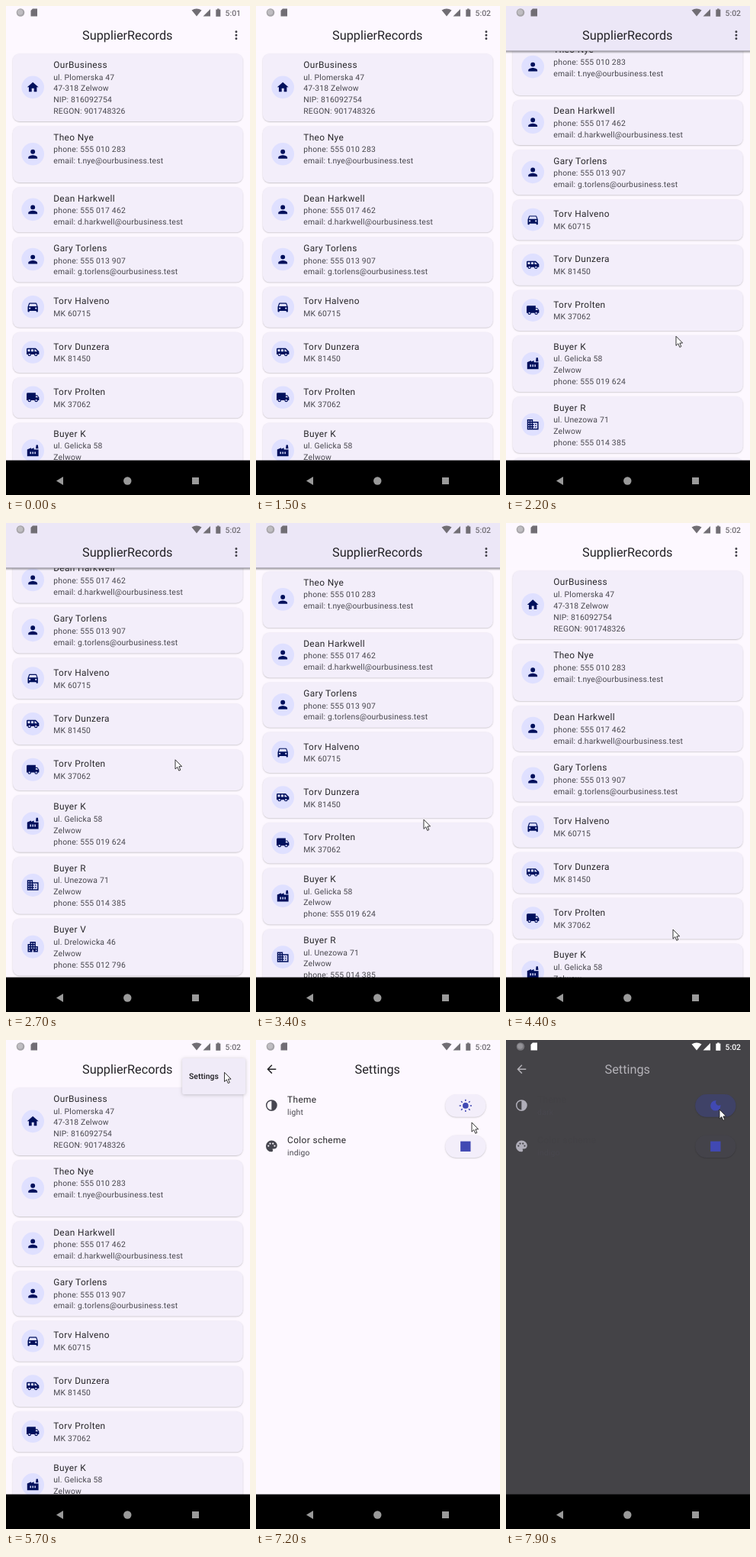
An HTML page with a canvas that plays this animation: 320x640 px, repeating every 8000 ms.

```html
<!DOCTYPE html>
<html lang="en">
<head>
<meta charset="utf-8">
<title>Directory app</title>
<style>
html, body { margin: 0; width: 100%; height: 100%; overflow: hidden; background: #000; }
canvas { display: block; width: 320px; height: 640px; }
</style>
</head>
<body>
<canvas id="stage" width="320" height="640"></canvas>
<script>
const ctx = document.getElementById('stage').getContext('2d');
const LOOP = 8000;
const K = 320 / 432;            // layout units (dp) to pixels
const NAV_TOP = 594.6;
const BAR = 80, FLOOR = 595 / K;

// Icon outlines on a 24-unit grid, filled even-odd
const dot = (x, y, r = 1.5) => `M${x - r} ${y}a${r} ${r} 0 1 0 ${2 * r} 0a${r} ${r} 0 1 0 ${-2 * r} 0z`;
const pane = (x, y) => `M${x} ${y}h2v2h-2z`;
const panes = (x, ...ys) => ys.map(y => pane(x, y)).join('');
const icons = {
  home: 'M10 20v-6h4v6h5v-8h3L12 3 2 12h3v8z',
  person: dot(12, 8, 4) + 'M12 14c-2.7 0-8 1.3-8 4v2h16v-2c0-2.7-5.3-4-8-4z',
  car: 'M18.9 6A1.5 1.5 0 0 0 17.5 5h-11A1.5 1.5 0 0 0 5.1 6L3 12v8a1 1 0 0 0 1 1h1a1 1 0 0 0 1-1v-1h12v1a1 1 0 0 0 1 1h1a1 1 0 0 0 1-1v-8zM5 11l1.5-4.5h11L19 11z' + dot(6.5, 14.5) + dot(17.5, 14.5),
  van: 'M17 5H3a2 2 0 0 0-2 2v9h2a3 3 0 0 0 6 0h5.5a3 3 0 0 0 6 0H23v-5zM3 7h4v4H3zM9 7h4v4H9zM15 7h1l4 4h-5z' + dot(6, 16) + dot(17.5, 16),
  truck: 'M20 8h-3V4H3a2 2 0 0 0-2 2v11h2a3 3 0 0 0 6 0h6a3 3 0 0 0 6 0h2v-5zM19.5 9.5l2 2.5H17V9.5z' + dot(6, 17) + dot(18, 17),
  factory: 'M22 10v12H2V10l7-3v2l5-2v3zM17.2 8.5 18 2h3l.8 6.5zM7 14h2v4H7zM11 14h2v4h-2zM15 14h2v4h-2z',
  office: 'M12 7V3H2v18h20V7zM20 19h-8v-2h2v-2h-2v-2h2v-2h-2V9h8z' + panes(4, 5, 9, 13, 17) + panes(8, 5, 9, 13, 17) + panes(16, 11, 15),
  tower: 'M17 11V3H7v4H3v14h8v-4h2v4h8V11z' + panes(5, 9, 13, 17) + panes(9, 5, 9, 13) + panes(13, 5, 9, 13) + panes(17, 13, 17),
  back: 'M20 11H7.8l5.6-5.6L12 4l-8 8 8 8 1.4-1.4L7.8 13H20z',
  contrast: dot(12, 12, 10) + 'M12 4a8 8 0 0 1 0 16z',
  palette: 'M12 2a10 10 0 1 0 0 20c1.4 0 2.5-1.1 2.5-2.5 0-.6-.2-1.2-.6-1.7-.4-.4 0-.8.4-.8H16c3.3 0 6-2.7 6-6 0-5-4.5-9-10-9z' + dot(6.5, 11.5) + dot(9.5, 7.5) + dot(14.5, 7.5) + dot(17.5, 11.5),
  moon: 'M12 3a9 9 0 1 0 9 9c0-.5 0-.9-.1-1.4a5.4 5.4 0 0 1-7.5-7.5C12.9 3 12.5 3 12 3z',
  more: dot(12, 6, 2) + dot(12, 12, 2) + dot(12, 18, 2)
};
for (const name in icons) icons[name] = new Path2D(icons[name]);

const mail = user => `email: ${user}@ourbusiness.test`;
const cards = [
  ['home', 'OurBusiness', 'ul. Plomerska 47', '47-318 Zelwow', 'NIP: 816092754', 'REGON: 901748326'],
  ['person', 'Theo Nye', 'phone: 555 010 283', mail('t.nye'), ''],
  ['person', 'Dean Harkwell', 'phone: 555 017 462', mail('d.harkwell')],
  ['person', 'Gary Torlens', 'phone: 555 013 907', mail('g.torlens')],
  ['car', 'Torv Halveno', 'MK 60715'],
  ['van', 'Torv Dunzera', 'MK 81450'],
  ['truck', 'Torv Prolten', 'MK 37062'],
  ['factory', 'Buyer K', 'ul. Gelicka 58', 'Zelwow', 'phone: 555 019 624'],
  ['office', 'Buyer R', 'ul. Unezowa 71', 'Zelwow', 'phone: 555 014 385'],
  ['tower', 'Buyer V', 'ul. Drelowicka 46', 'Zelwow', 'phone: 555 012 796']
];

// Keyframes: [time, value, value...]
const motion = {
  cursor: [[1600, 224, 555], [1700, 224, 555], [2700, 222, 310], [2900, 222, 275], [3400, 220, 388], [4400, 219, 532],
    [4550, 219, 535], [5300, 299, 36], [5550, 299, 38], [5900, 270, 48], [6250, 270, 50], [6800, 284, 100],
    [7200, 283, 108], [7550, 280, 91]],
  scroll: [[1737, 0], [2496, 186.8], [2993, 186.8], [3400, 94], [4053, 0]],
  stretchEnd: [[2496, 0], [2700, .01], [2900, .014], [2993, 0]],
  stretchTop: [[4053, 0], [4400, .011], [4550, .011], [4750, 0]],
  lifted: [[1740, 0], [1940, 1], [4053, 1], [4250, 0]],
  menu: [[5450, 0], [5600, 1], [6050, 1], [6200, 0]],
  page: [[6100, 0], [6400, 1]],
  dark: [[7655, 0], [7955, 1]]
};

function at(keys, t, i = 1) {
  if (t <= keys[0][0]) return keys[0][i];
  for (let n = 1; n < keys.length; n++) {
    const a = keys[n - 1], b = keys[n];
    if (t <= b[0]) return a[i] + (b[i] - a[i]) * (t - a[0]) / (b[0] - a[0]);
  }
  return keys[keys.length - 1][i];
}

function mix(from, to, p) {
  const part = (hex, n) => parseInt(hex.slice(1 + 2 * n, 3 + 2 * n), 16);
  return `rgb(${[0, 1, 2].map(n => Math.round(part(from, n) + (part(to, n) - part(from, n)) * p))})`;
}

function text(str, x, y, size, color, spacing = 0, align = 'left', weight = 400) {
  ctx.font = `${weight} ${size}px Roboto, sans-serif`;
  ctx.textRendering = 'geometricPrecision';
  ctx.letterSpacing = spacing + 'px';
  ctx.textAlign = align;
  ctx.fillStyle = color;
  ctx.fillText(str, x, y);
}

function icon(name, cx, cy, color) {
  ctx.save();
  ctx.translate(cx - 12, cy - 12);
  ctx.fillStyle = color;
  ctx.fill(icons[name], 'evenodd');
  ctx.restore();
}

function disc(x, y, r, color) {
  ctx.fillStyle = color;
  ctx.beginPath();
  ctx.arc(x, y, r, 0, 7);
  ctx.fill();
}

function poly(color, ...pts) {
  ctx.fillStyle = color;
  ctx.beginPath();
  pts.forEach(p => ctx.lineTo(...p));
  ctx.closePath();
  ctx.fill();
}

function raised(x, y, w, h, r, color, blur = 1.6) {
  ctx.save();
  ctx.shadowColor = 'rgba(0,0,0,.2)';
  ctx.shadowBlur = blur;
  ctx.shadowOffsetY = .8;
  ctx.fillStyle = color;
  ctx.beginPath();
  ctx.roundRect(x, y, w, h, r);
  ctx.fill();
  ctx.restore();
}

function tileText(x, y, title, lines, main, minor) {
  text(title, x, y + 17, 16, main, .5);
  lines.forEach((line, i) => text(line, x, y + 38.3 + 20 * i, 14, minor, .25));
}

function drawCards(t) {
  const top = at(motion.stretchTop, t), end = at(motion.stretchEnd, t);
  const anchor = end ? FLOOR : BAR;
  ctx.save();
  ctx.translate(0, anchor);
  ctx.scale(1, 1 + top + end);
  ctx.translate(0, -anchor);
  let y = 84 - at(motion.scroll, t) / K;
  for (const [glyph, title, ...lines] of cards) {
    const inner = 24 + 20 * lines.length;
    const h = Math.max(72, inner + 16);
    const middle = y + h / 2 - .4;
    raised(12, y, 407.5, h, 12, '#f3eefa');
    disc(47.5, middle, 20, '#dfe0ff');
    icon(glyph, 47.5, middle, '#00105c');
    tileText(84, y + (h - inner) / 2, title, lines, '#28272b', '#48474e');
    y += h + 8;
  }
  ctx.restore();
}

function drawHome(t) {
  const lifted = at(motion.lifted, t);
  ctx.fillStyle = '#fdf8ff';
  ctx.fillRect(0, 0, 432, FLOOR);
  drawCards(t);
  ctx.fillStyle = mix('#fdf8ff', '#ece7f7', lifted);
  ctx.fillRect(0, 0, 432, BAR);
  if (lifted) {
    const shade = ctx.createLinearGradient(0, BAR - 1, 0, BAR + 4);
    shade.addColorStop(0, `rgba(0,0,0,${.42 * lifted})`);
    shade.addColorStop(1, 'rgba(0,0,0,0)');
    ctx.fillStyle = shade;
    ctx.fillRect(0, BAR - 1, 432, 5);
  }
  text('SupplierRecords', 215, 59.5, 22, '#242327', 0, 'center');
  icon('more', 407.6, 51.6, '#3f3e46');
}

function drawMenu(shown) {
  if (!shown) return;
  ctx.save();
  ctx.globalAlpha = shown;
  raised(312, 32, 112, 64, 4, '#f0ebf8', 4);
  text('Settings', 324, 69, 14, '#1c1b1f', .1, 'left', 500);
  ctx.restore();
}

function drawSun(x, y, color) {
  disc(x, y, 5.2, color);
  ctx.strokeStyle = color;
  ctx.lineWidth = 2;
  ctx.beginPath();
  for (let i = 0; i < 8; i++) {
    const c = Math.cos(i * Math.PI / 4), s = Math.sin(i * Math.PI / 4);
    ctx.moveTo(x + 8 * c, y + 8 * s);
    ctx.lineTo(x + 11 * c, y + 11 * s);
  }
  ctx.stroke();
}

function drawSettings(shown, dark) {
  if (!shown) return;
  const ease = 1 - (1 - shown) ** 3;
  const head = mix('#242327', '#d2d0d6', dark);
  const glyph = mix('#46464f', '#c7c5d0', dark);
  const late = Math.max(0, dark - .62);    // row text follows the theme with a delay
  const main = mix('#28272b', '#b0aeb4', late), minor = mix('#48474e', '#48474e', late);
  const pill = mix('#f3eefa', '#1d1d23', dark), accent = '#4149b3';
  ctx.save();
  ctx.globalAlpha = ease;
  ctx.translate(216, FLOOR / 2);
  ctx.scale(.9 + .1 * ease, .9 + .1 * ease);
  ctx.translate(-216, -FLOOR / 2);
  ctx.fillStyle = mix('#fdf8ff', '#1b1b1f', dark);
  ctx.fillRect(0, 0, 432, FLOOR);
  icon('back', 27.5, 51.6, head);
  text('Settings', 215, 59.5, 22, head, 0, 'center');

  ctx.save();
  ctx.translate(27.5, 115.5);
  ctx.scale(-1, 1);
  icon('contrast', 0, 0, glyph);
  ctx.restore();
  tileText(55.5, 93.5, 'Theme', [dark ? 'dark' : 'light'], main, minor);
  raised(335, 96, 72, 40, 20, pill);
  if (dark) {
    ctx.fillStyle = 'rgba(55,62,165,.32)';
    ctx.beginPath();
    ctx.roundRect(335, 96, 72, 40, 20);
    ctx.fill();
    icon('moon', 371, 116, accent);
  } else {
    drawSun(371, 116, accent);
  }

  icon('palette', 27.5, 187.5, glyph);
  tileText(55.5, 165.5, 'Color scheme', ['indigo'], main, minor);
  raised(335, 168, 72, 40, 20, pill);
  ctx.fillStyle = accent;
  ctx.fillRect(362, 179, 18, 18);
  ctx.restore();
}

// The system bars and the pointer are laid out in pixels
function drawStatus(t, dark) {
  const color = dark > .4 ? '#ffffff' : '#716e74';
  disc(19, 8.5, 5.3, dark > .4 ? '#77767b' : '#a5a3a7');
  disc(18.6, 8.1, 3.6, dark > .4 ? '#939297' : '#bfbdc1');
  poly(color, [35, 3.5], [41, 3.5], [41, 13.5], [32.5, 13.5], [32.5, 6]);
  ctx.fillStyle = color;
  ctx.beginPath();
  ctx.moveTo(250, 13.5);
  ctx.lineTo(243.5, 5.6);
  ctx.quadraticCurveTo(250, 1.4, 256.5, 5.6);
  ctx.fill();
  poly(color, [258.5, 13.5], [268, 13.5], [268, 4]);
  ctx.fillRect(275.3, 4.6, 6, 9.2);
  ctx.fillRect(277, 3.5, 2.6, 1.4);
  text(t < 500 ? '5:01' : '5:02', 287.5, 12.6, 10.4, color, 0, 'left', 500);
}

function drawNav() {
  const grey = '#9a9a9a';
  ctx.fillStyle = '#000';
  ctx.fillRect(0, NAV_TOP, 320, 640 - NAV_TOP);
  poly(grey, [66, 621.5], [75, 616], [75, 627]);
  disc(159.3, 621.5, 5.2, grey);
  ctx.fillStyle = grey;
  ctx.fillRect(244, 617, 9, 9);
}

function drawCursor(t) {
  if (t < motion.cursor[0][0]) return;
  ctx.save();
  ctx.translate(at(motion.cursor, t), at(motion.cursor, t, 2));
  poly('#fff', [0, 0], [0, 12.2], [2.8, 9.6], [4.8, 14.3], [6.8, 13.4], [4.9, 8.9], [8.6, 8.8]);
  ctx.strokeStyle = '#222';
  ctx.lineWidth = .9;
  ctx.stroke();
  ctx.restore();
}

function frame() {
  const t = performance.now() % LOOP;
  const page = at(motion.page, t), dark = at(motion.dark, t);
  ctx.setTransform(K, 0, 0, K, 0, 0);
  if (page < 1) {
    drawHome(t);
    drawMenu(at(motion.menu, t));
  }
  drawSettings(page, dark);
  ctx.setTransform(1, 0, 0, 1, 0, 0);
  drawStatus(t, dark);
  drawNav();
  drawCursor(t);
  requestAnimationFrame(frame);
}
requestAnimationFrame(frame);
</script>
</body>
</html>
```
